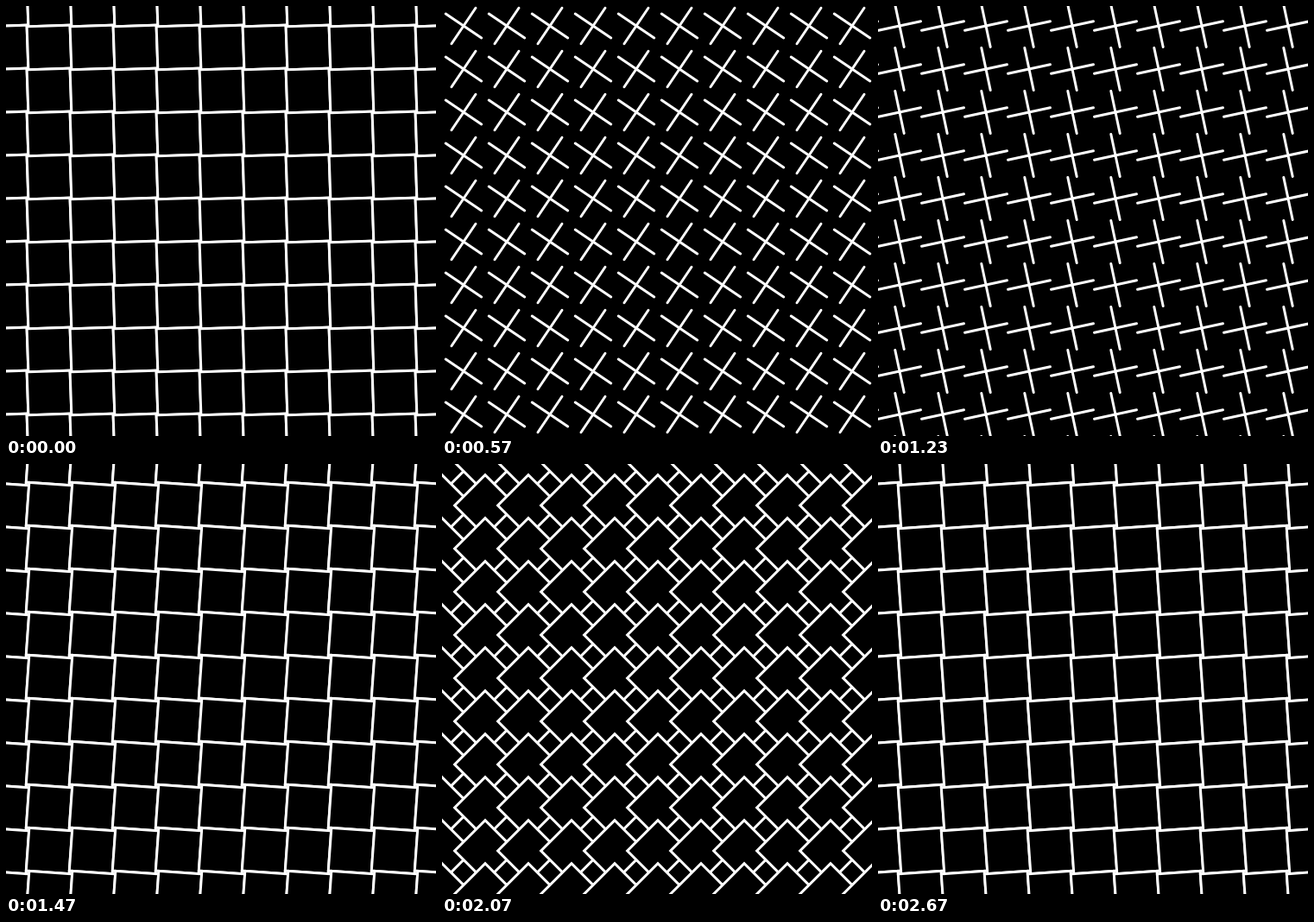
These frames come from a looping animation (498x498 px, 2.7 s). An HTML page with a canvas:

```html
<!DOCTYPE html>
<html lang="en">
<head>
<meta charset="utf-8">
<title>Crosses and squares</title>
<style>
  html, body { margin: 0; width: 100%; height: 100%; overflow: hidden; background: #000; }
  canvas { display: block; }
</style>
</head>
<body>
<canvas id="stage" width="498" height="498"></canvas>
<script>
const ctx = document.getElementById('stage').getContext('2d');
const SIZE = 498, CELL = 50, HALF = CELL / 2;
const LOOP = 2700, STEP = 30, START = 60;
const CROSS_TIME = 1350, SQUARE_TIME = 1320;

function cross() {
  ctx.beginPath();
  ctx.moveTo(-HALF, 0);
  ctx.lineTo(HALF, 0);
  ctx.moveTo(0, -HALF);
  ctx.lineTo(0, HALF);
  ctx.stroke();
}

function square() {
  ctx.fillRect(-HALF, -HALF, CELL, CELL);
  ctx.strokeRect(-HALF, -HALF, CELL, CELL);
}

// Row by row, so each shape covers its left and upper neighbours.
function tile(shape, x0, y0, angle) {
  for (let y = y0 - CELL; y < SIZE + CELL; y += CELL) {
    for (let x = x0 - CELL; x < SIZE + CELL; x += CELL) {
      ctx.save();
      ctx.translate(x, y);
      ctx.rotate(angle);
      shape();
      ctx.restore();
    }
  }
}

function draw(time) {
  const t = (Math.floor(time / STEP) * STEP + LOOP - START) % LOOP;
  ctx.fillStyle = '#000';
  ctx.fillRect(0, 0, SIZE, SIZE);
  ctx.strokeStyle = '#fff';
  ctx.lineWidth = 3;
  ctx.lineCap = 'round';
  if (t < CROSS_TIME) {
    tile(cross, 25, 23, t / CROSS_TIME * Math.PI / 2);
  } else {
    const turn = Math.min(1, (t - CROSS_TIME) / SQUARE_TIME);
    tile(square, 0, -2, turn * Math.PI / 2);
  }
}

const begin = performance.now();
function frame() {
  draw(performance.now() - begin);
  requestAnimationFrame(frame);
}
frame();
</script>
</body>
</html>
```
